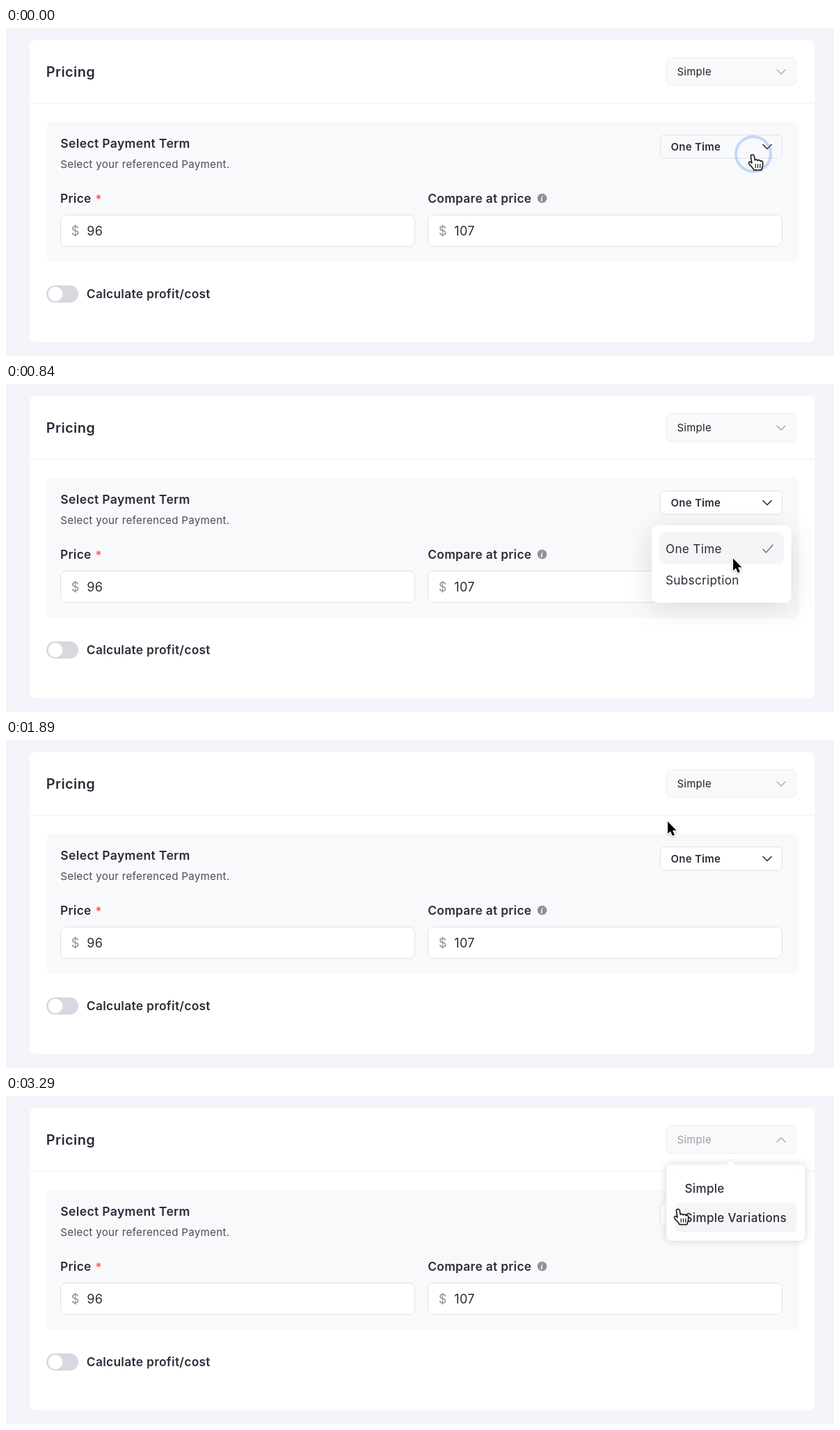
Recreate the animation shown at these times as an HTML page with a canvas. Size 1190 by 471 pixels, loop 3360 ms.

```html
<!DOCTYPE html>
<html lang="en">
<head>
<meta charset="utf-8">
<title>Pricing form</title>
<style>
  html, body { margin: 0; width: 100%; height: 100%; overflow: hidden; background: #f4f5fb; }
  canvas { display: block; width: 1190px; height: 471px; }
</style>
</head>
<body>
<canvas id="stage" width="1190" height="471"></canvas>
<script>
const ctx = document.getElementById('stage').getContext('2d');
const LOOP = 3360, STEP = 70;
const INK = '#2b2b39', LINE = '#dfe1e6', PANEL = '#f8f9fb', HOVER = '#f4f5f7';

// Pointer tip: time, x, y; eased between entries
const PATH = [
  [0, 1073, 182], [140, 1073, 184], [490, 1072, 318], [630, 1072, 318],
  [910, 1040, 238], [1120, 905, 178], [1190, 872, 168], [1330, 866, 168],
  [1540, 866, 168], [1890, 951, 117], [2310, 962, 69], [2590, 962, 69],
  [2870, 961, 141], [3080, 961, 144], [3290, 966, 162.5], [3360, 966, 162.5]
];
const CLICKS = [0, 1470, 2450];
const TERM_MENU = [70, 1540];
const TYPE_OPEN = 2450;

const HAND = new Path2D('M-2.6 2.2C-2.6-.6 2-.9 2.3 1.8L3.2 8C4 6.4 7 6.6 7.3 8.6' +
  'C8.2 7 11 7.4 11.2 9.4C12.2 8.2 14.6 9 14.6 11V15C14.6 18 13 19 12.8 22H1.8' +
  'C1.4 19.5-2 17-5 13.2C-6.6 11-4.4 9.2-2.6 10.6L-1 12Z');
const KNUCKLES = new Path2D('M4.2 13.5V18.5M7.5 13.5V18.5M10.8 13.5V18.5');
const ARROW = new Path2D('M0 0V17.5L4 13.9L6.8 20.6L9.8 19.3L7 12.8H12.4Z');

const clamp = v => Math.max(0, Math.min(1, v));
const mix = (a, b, p) => a + (b - a) * p;

function text(str, x, y, size, weight = 400, color = INK) {
  ctx.font = `${weight} ${size}px Inter, sans-serif`;
  ctx.letterSpacing = size * 0.02 + 'px';
  ctx.fillStyle = color;
  ctx.fillText(str, x, y);
}

// Rounded box given by its edges
function box(l, t, r, b, radius, fill, stroke) {
  ctx.beginPath();
  ctx.roundRect(l, t, r - l, b - t, radius);
  ctx.fillStyle = fill;
  ctx.fill();
  if (stroke) {
    ctx.strokeStyle = stroke;
    ctx.lineWidth = 1;
    ctx.stroke();
  }
}

function disc(x, y, r, color) {
  ctx.beginPath();
  ctx.arc(x, y, r, 0, Math.PI * 2);
  ctx.fillStyle = color;
  ctx.fill();
}

function polyline(points, color, width) {
  ctx.beginPath();
  points.forEach(([x, y]) => ctx.lineTo(x, y));
  ctx.strokeStyle = color;
  ctx.lineWidth = width;
  ctx.lineCap = ctx.lineJoin = 'round';
  ctx.stroke();
}

function chevron(x, y, color, width, turn = 0) {
  ctx.save();
  ctx.translate(x, y);
  ctx.rotate(turn);
  polyline([[-6, -3], [0, 3], [6, -3]], color, width);
  ctx.restore();
}

function shadow(color, blur, dy) {
  ctx.shadowColor = color;
  ctx.shadowBlur = blur;
  ctx.shadowOffsetY = dy;
}

function field(left, right, value) {
  box(left + .5, 268.5, right, 313.5, 8, '#fff', LINE);
  text('$', left + 15.7, 297.5, 18, 400, '#8f919c');
  text(value, left + 38.2, 297.5, 18);
}

function drawForm(t) {
  ctx.fillStyle = '#f4f5fb';
  ctx.fillRect(0, 0, 1190, 471);
  box(34, 17, 1162, 451, 8, '#fff');
  ctx.fillStyle = '#eeeff3';
  ctx.fillRect(34, 107.5, 1128, 1);
  text('Pricing', 57.8, 70, 19.9, 600);

  const open = clamp((t - TYPE_OPEN) / 300);
  box(948.5, 42.5, 1136, 82.5, 8, PANEL, '#eceef1');
  const tone = Math.round(mix(30, 155, clamp(open * 3.2)));
  text('Simple', 964.5, 68.3, 14.9, 400, `rgb(${tone},${tone + 2},${tone + 7})`);
  chevron(1114, 63, '#999ca5', 1.1, open * Math.PI);

  box(59, 134, 1140, 336, 8, PANEL);
  text('Select Payment Term', 78.3, 172, 17.55, 600);
  text('Select your referenced Payment.', 78.3, 200.7, 15.1, 400, '#4c4d57');
  box(940.5, 153.5, 1115.5, 187, 6, t < 70 ? PANEL : '#fff', LINE);
  text('One Time', 955.5, 175.5, 14.95, 600);
  chevron(1094, 170.5, INK, 1.6);

  text('Price', 78, 250.8, 17.3, 600);
  text('*', 128.5, 251.5, 17.3, 500, '#f0544f');
  text('Compare at price', 606.2, 250.8, 17.3, 600);
  disc(770.5, 244.5, 6.8, '#8f909c');
  text('i', 768.6, 248.6, 10.5, 'italic 700', '#fff');
  field(78, 587.5, '96');
  field(606, 1115.5, '107');

  box(58, 369.5, 104, 394.5, 12.5, '#d7d8e0');
  disc(71, 382, 10.4, '#fff');
  text('Calculate profit/cost', 115.8, 388, 17.3, 600);
}

function drawTermMenu(t) {
  if (t < TERM_MENU[0] || t >= TERM_MENU[1]) return;
  ctx.save();
  ctx.globalAlpha = clamp((t - TERM_MENU[0] + STEP) / 140);
  shadow('rgba(25,25,28,.13)', 38, 8);
  box(928, 203, 1128.5, 314, 8, '#fff');
  shadow('transparent', 0, 0);
  const row = t < 210 ? -1 : t < 280 || t >= 840 ? 0 : 1;
  if (row >= 0) box(938.5, 213 + row * 45.5, 1118, 258.5 + row * 45.5, 8, HOVER);
  text('One Time', 948, 242.7, 17.1);
  text('Subscription', 948, 288, 17.1);
  polyline([[1088, 237.5], [1092.5, 242], [1102, 231]], '#70727e', 1.5);
  ctx.restore();
}

function drawTypeMenu(t, tipY) {
  if (t <= TYPE_OPEN) return;
  const p = 1 - Math.pow(1 - clamp((t - TYPE_OPEN) / 300), 2.2);
  ctx.save();
  ctx.globalAlpha = p;
  ctx.translate(0, 97);
  ctx.scale(1, p);
  ctx.translate(0, -97);
  const depth = clamp(2 * p - 1);
  shadow(`rgba(0,0,0,${.12 * depth})`, 12, 0);
  box(948.5, 97.5, 1149, 208.5, 7, '#fff', `rgba(231,233,238,${depth})`);
  shadow('transparent', 0, 0);
  if (p > .9) {
    ctx.beginPath();
    ctx.moveTo(1035, 98.5);
    ctx.lineTo(1042, 91.5);
    ctx.lineTo(1049, 98.5);
    ctx.fillStyle = '#fff';
    ctx.fill();
    polyline([[1035.5, 97.5], [1042, 91.5], [1048.5, 97.5]], '#e7e9ee', 1);
  }
  if (tipY > 111) {
    const top = tipY > 154 ? 153.5 : 111;
    box(961.5, top, 1136.5, top + 42.5, 8, HOVER);
  }
  text('Simple', 975.5, 138.7, 17, 500);
  text('Simple Variations', 975.5, 181.2, 17, 500);
  ctx.restore();
}

function tipAt(t) {
  const i = Math.max(1, PATH.findIndex(k => k[0] >= t));
  const [t0, x0, y0] = PATH[i - 1], [t1, x1, y1] = PATH[i];
  const u = clamp((t - t0) / (t1 - t0));
  const p = u * u * (3 - 2 * u);
  return [mix(x0, x1, p), mix(y0, y1, p)];
}

function drawRing(t, x, y) {
  const age = t - CLICKS.filter(c => c <= t).pop();
  if (age >= 210) return;
  const u = age / STEP;
  ctx.beginPath();
  ctx.arc(x + 1, y - 1, 25 + 8 * u - u * u, 0, Math.PI * 2);
  ctx.strokeStyle = `rgba(80,150,240,${[.32, .62, .3][Math.round(u)]})`;
  ctx.lineWidth = 4;
  ctx.stroke();
}

function drawPointer(t, x, y) {
  const hand = t < 140 || (t > 1890 && y < 84) || t > TYPE_OPEN;
  ctx.save();
  ctx.translate(x, y);
  ctx.lineJoin = ctx.lineCap = 'round';
  shadow('rgba(0,0,0,.25)', 3, 1);
  if (hand) {
    ctx.fillStyle = '#fff';
    ctx.fill(HAND);
    shadow('transparent', 0, 0);
    ctx.strokeStyle = '#111';
    ctx.lineWidth = 1.5;
    ctx.stroke(HAND);
    ctx.lineWidth = 1.2;
    ctx.stroke(KNUCKLES);
  } else {
    ctx.strokeStyle = '#fff';
    ctx.lineWidth = 2.6;
    ctx.stroke(ARROW);
    shadow('transparent', 0, 0);
    ctx.fillStyle = '#000';
    ctx.fill(ARROW);
  }
  ctx.restore();
}

function draw(now) {
  const t = Math.floor((now % LOOP) / STEP) * STEP;
  const [x, y] = tipAt(t);
  drawForm(t);
  drawTermMenu(t);
  drawTypeMenu(t, y);
  drawRing(t, x, y);
  drawPointer(t, x, y);
}

const start = performance.now();
function tick() {
  draw(Math.max(0, performance.now() - start));
  requestAnimationFrame(tick);
}
tick();
</script>
</body>
</html>
```
